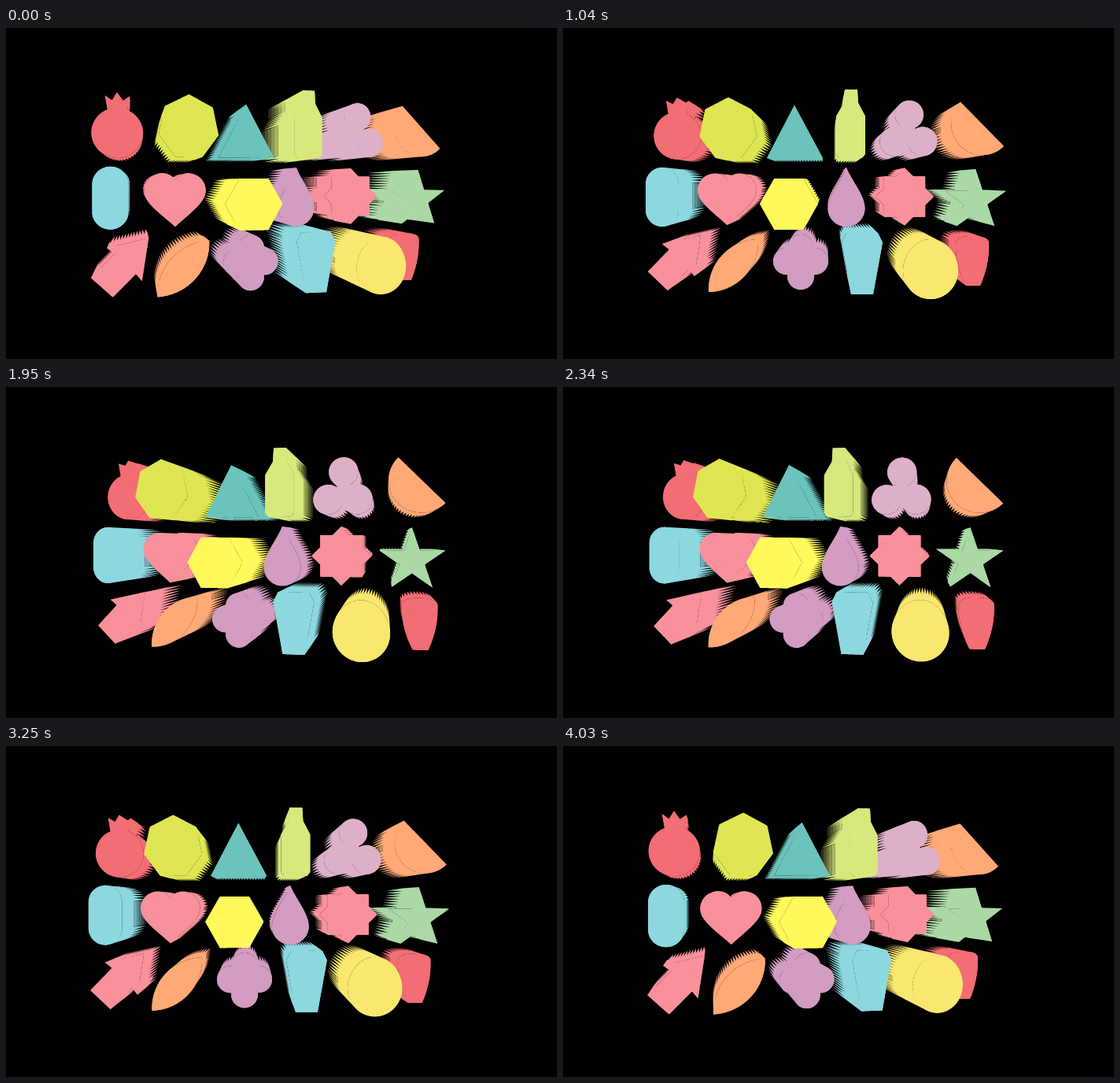
An HTML page with a canvas that plays this animation: 700 by 420 pixels, repeating every 4.16 s.

```html
<!DOCTYPE html>
<html lang="en">
<head>
<meta charset="utf-8">
<title>Extruded shapes</title>
<style>
  html, body { margin: 0; width: 100%; height: 100%; overflow: hidden; background: #000; }
  canvas { display: block; width: 700px; height: 420px; }
</style>
</head>
<body>
<canvas id="stage" width="700" height="420"></canvas>
<script>
const ctx = document.getElementById('stage').getContext('2d');
const STEP = 130, STEPS = 32, TURN = 0.028;
const CX = 334, CY = 195, FOCAL = 740, BACK = 95;
const SOLID = 0.45, TOOTH = 4, BANDS = 5;

const poly = pts => 'M' + pts.map(p => p.join(' ')).join('L') + 'Z';

// Regular polygon, or a star when inner < 1
function ring(cx, cy, rx, ry, n, inner = 1) {
  const pts = [], count = inner < 1 ? n * 2 : n;
  for (let i = 0; i < count; i++) {
    const a = i * 2 * Math.PI / count - Math.PI / 2;
    const k = inner < 1 && i % 2 ? inner : 1;
    pts.push([cx + rx * k * Math.cos(a), cy + ry * k * Math.sin(a)]);
  }
  return poly(pts);
}

const disc = (x, y, r) =>
  `M${x - r} ${y}A${r} ${r} 0 0 1 ${x + r} ${y}A${r} ${r} 0 0 1 ${x - r} ${y}Z`;

const rose = '#f8919c', red = '#f36d74', sky = '#8dd7df',
      mauve = '#d39cc1', orange = '#ffa977';

// [colour, lift towards the viewer, outlines as seen head-on]
const table = [
  [red, 10, 'M134 109L131 92L139 98L145 88L152 98L160 92L157 109A30 30 0 1 1 134 109Z'],
  ['#dfe653', 90, ring(210, 128.5, 37.5, 40.5, 7)],
  ['#6bc3bc', 44, 'M294 98L330 165L259 165Z'],
  ['#d7e87c', 80, 'M358 78L374 78L375 95L384 112L384 160L380 165L351 165L347 160L347 112L357 95Z'],
  ['#ddb0c8', 56, disc(440, 110, 18), disc(421, 144, 18.5), disc(457, 144, 18.5),
    'M440 114L456 144L424 144Z'],
  [orange, 50, 'M505 94L560 150A39 39 0 0 1 505 94Z'],
  [sky, 57, 'M105 198A21 21 0 0 1 147 198L147 231A21 21 0 0 1 105 231Z'],
  [rose, 33, 'M208.5 193C202 183 190 184 186 186C174 189 167 204 174 216C180 227 198 240 208.5 250C219 240 237 227 243 216C250 204 243 189 231 186C227 184 215 183 208.5 193Z'],
  ['#fff95b', 105, 'M250 223L268.5 191L305.5 191L324 223L305.5 256L268.5 256Z'],
  [mauve, 42, 'M360 177C366 193 383.5 212 383.5 229A23.5 23 0 0 1 336.5 229C336.5 212 354 193 360 177Z'],
  [rose, 41, ring(434, 214, 37, 36.5, 8, 0.765)],
  ['#abd9a6', 63, ring(524, 219, 41, 40, 5, 0.382)],
  [rose, 40, 'M108 309L135 281L126 274L175 263L167 315L160 306L133 333Z'],
  [orange, 42, 'M185 335A64 64 0 0 1 248 268A64 64 0 0 1 185 335Z'],
  [mauve, 37, disc(284, 296, 17), disc(320, 296, 17), disc(302, 279, 17), disc(302, 315, 17),
    'M284 296L302 279L320 296L302 315Z'],
  [sky, 66, 'M360 260L400 260L406 272L394 338L366 338L354 272Z'],
  ['#f9e770', 79, 'M467 268C487 268 502 288 502 308A35 36 0 0 1 432 308C432 288 447 268 467 268Z'],
  [red, 2, 'M499 273Q500 264 519 264Q540 264 541 272Q542 300 530 327L512 327Q498 300 499 273Z']
];

function sample(d) {
  const path = document.createElementNS('http://www.w3.org/2000/svg', 'path');
  path.setAttribute('d', d);
  const len = path.getTotalLength();
  const n = Math.round(len / TOOTH) * TOOTH;
  return Array.from({ length: n }, (_, i) => {
    const p = path.getPointAtLength(len * i / n);
    return [p.x, p.y];
  });
}

const shapes = table
  .map(([colour, lift, ...outlines]) => ({ colour, lift, outlines: outlines.map(sample) }))
  .sort((a, b) => a.lift - b.lift);

// Screen place of an outline point, u = 0 at the face and 1 at the back
function project([px, py], lift, u, turn) {
  const k = (FOCAL - lift) / FOCAL, s = Math.sin(turn), c = Math.cos(turn);
  const x = (px - CX) * k, y = (py - CY) * k, w = -lift + u * (BACK + lift);
  const m = FOCAL / (FOCAL - x * s + w * c);
  return [CX + (x * c + w * s) * m, CY + y * m];
}

// Adds a polygon, always wound the same way so overlaps never cancel
function add(path, pts) {
  let area = 0;
  pts.forEach((p, i) => {
    const q = pts[(i + 1) % pts.length];
    area += p[0] * q[1] - q[0] * p[1];
  });
  if (area < 0) pts.reverse();
  pts.forEach((p, i) => i ? path.lineTo(p[0], p[1]) : path.moveTo(p[0], p[1]));
  path.closePath();
}

function drawTrail({ colour, lift, outlines }, turn) {
  const at = (p, u) => project(p, lift, u, turn);
  const body = new Path2D();
  const bands = Array.from({ length: BANDS }, () => new Path2D());
  for (const pts of outlines) {
    for (let i = 0; i < pts.length; i += TOOTH) {
      const a = pts[i], mid = pts[i + TOOTH / 2], b = pts[(i + TOOTH) % pts.length];
      for (const [p, q] of [[a, mid], [mid, b]]) {
        add(body, [at(p, 0), at(q, 0), at(q, SOLID), at(p, SOLID)]);
      }
      if (Math.abs(b[0] - a[0]) < 0.1 * Math.abs(b[1] - a[1])) {
        bands.forEach((band, j) => {
          const u = SOLID + (1 - SOLID) * j / BANDS;
          const v = SOLID + (1 - SOLID) * (j + 1) / BANDS;
          add(band, [at(a, u), at(b, u), at(b, v), at(a, v)]);
        });
      } else {
        add(body, [at(a, SOLID), at(mid, 1), at(b, SOLID)]);
      }
    }
  }
  ctx.fillStyle = colour;
  for (let j = BANDS - 1; j >= 0; j--) {
    ctx.globalAlpha = 0.8 - 0.15 * j;
    ctx.fill(bands[j]);
  }
  ctx.globalAlpha = 1;
  ctx.fill(body);
}

function drawFace({ colour, lift, outlines }, turn) {
  const face = new Path2D();
  for (const pts of outlines) add(face, pts.map(p => project(p, lift, 0, turn)));
  ctx.fillStyle = colour;
  ctx.fill(face);
}

let shown = -1;
function frame() {
  const i = Math.floor(performance.now() / STEP) % STEPS;
  if (i !== shown) {
    shown = i;
    const turn = (Math.min(i, STEPS - i) - STEPS / 4) * TURN;
    ctx.fillStyle = '#000';
    ctx.fillRect(0, 0, 700, 420);
    shapes.forEach(s => drawTrail(s, turn));
    shapes.forEach(s => drawFace(s, turn));
  }
  requestAnimationFrame(frame);
}
frame();
</script>
</body>
</html>
```
